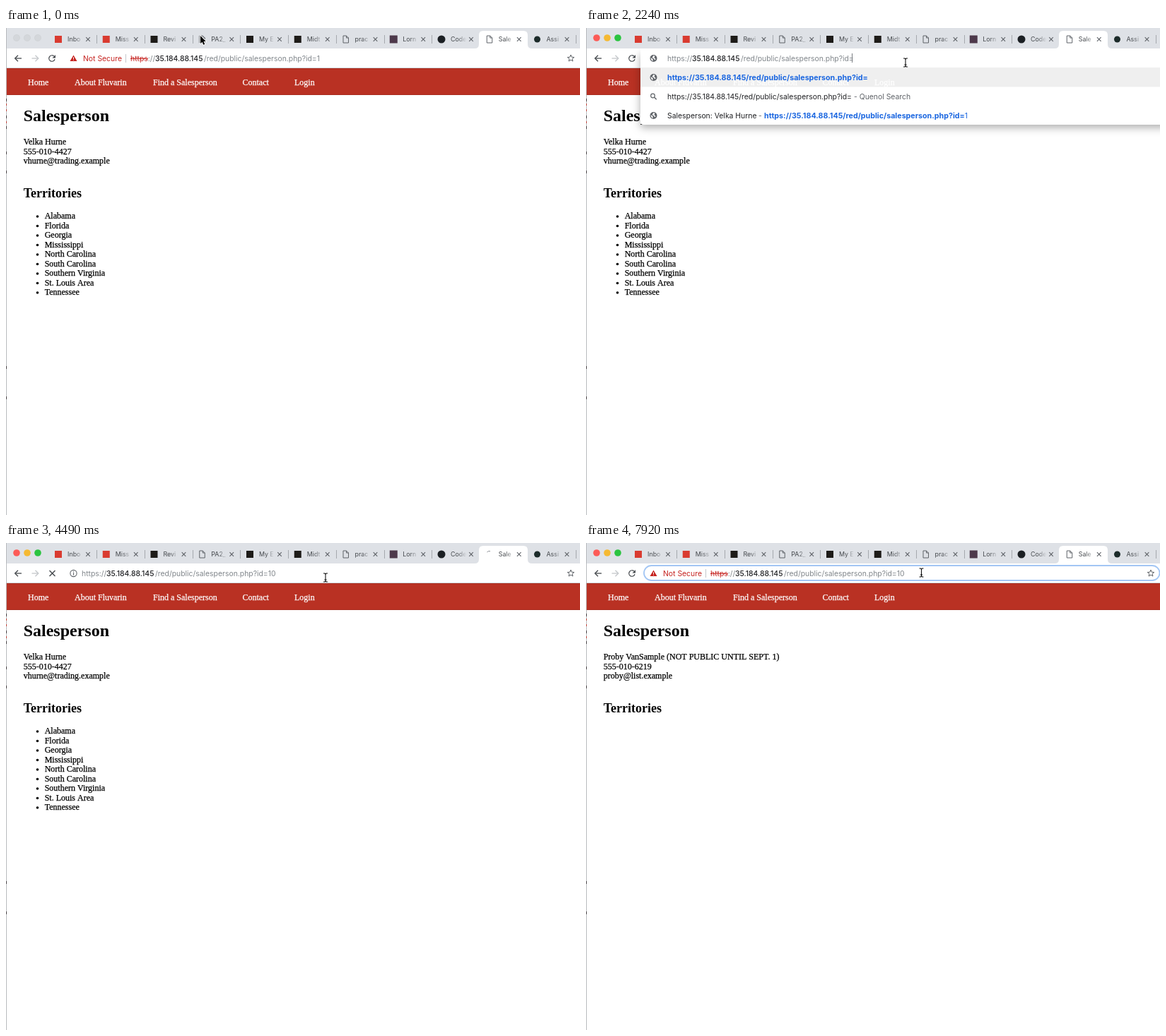
Recreate the animation shown at these times as an HTML page with a canvas. Size 812 by 690 pixels, loop 8 s.

```html
<!DOCTYPE html>
<html lang="en">
<head>
<meta charset="utf-8">
<title>Salesperson</title>
<style>
  html, body { margin: 0; width: 100%; height: 100%; overflow: hidden; background: #fff; }
  canvas { display: block; }
</style>
</head>
<body>
<canvas id="stage" width="812" height="690"></canvas>
<script>
const ctx = document.getElementById('stage').getContext('2d');
const LOOP = 8000;
const SANS = 'Inter, Roboto, "Liberation Sans", sans-serif';
const SERIF = '"Liberation Serif", "Times New Roman", serif';
const UI = `10.4px ${SANS}`;
const UI_HOST = `500 10.4px ${SANS}`;
const UI_BOLD = `700 10.7px ${SANS}`;
const BODY = `12px ${SERIF}`;
const INK = '#202124', GRAY = '#5f6368', SOFT = '#80868b', RED = '#c5221f', BLUE = '#1a66e0';

const TABS = [
  ['Inbo', 'square', '#d93b30', 10], ['Miss', 'square', '#d93b30', 10],
  ['Revi', 'square', '#1d1b18', 10], ['PA2_', 'page'],
  ['My E', 'square', '#1d1b18', 10], ['Midt', 'square', '#1d1b18', 10],
  ['prac', 'page'], ['Lorn', 'square', '#4d394b', 11],
  ['Code', 'circle', '#1b1f23', 11], ['Sale', 'page'],
  ['Assi', 'circle', '#1c2b2a', 9]
];
const ACTIVE = 9;
const NAV = [['Home', 31], ['About Fluvarin', 97], ['Find a Salesperson', 208], ['Contact', 334.5], ['Login', 408]];
const STATES = ['Alabama', 'Florida', 'Georgia', 'Mississippi', 'North Carolina',
  'South Carolina', 'Southern Virginia', 'St. Louis Area', 'Tennessee'];
const FIRST = ['Velka Hurne', '555-010-4427', 'vhurne@trading.example'];
const SECOND = ['Proby VanSample (NOT PUBLIC UNTIL SEPT. 1)', '555-010-6219', 'proby@list.example'];

// Pointer: start time, x, y, text cursor?
const POINTER = [
  [0, 275, 11, 0], [150, 302, 15, 0], [300, 350, 25, 0], [450, 400, 36, 0],
  [600, 430, 43, 1], [750, 440, 46, 1], [900, 442, 47, 1],
  [1350, 445, 48, 1], [1500, 449, 49, 1], [1640, 452, 49, 1],
  [4040, 451, 47, 0], [4490, 452, 49, 1],
  [5540, 455, 47, 1], [5690, 462, 44, 1], [5840, 470, 42.5, 1], [5990, 481, 41, 1],
  [6290, 478, 42, 1], [6440, 474.5, 42, 1]
];
const CARET = [[900, 1350], [1940, 2690], [3290, 4490], [7470, 7920]];
const within = (t, a, b) => t >= a && t < b;

function text(s, x, y, font, color) {
  ctx.font = font;
  ctx.fillStyle = color;
  ctx.fillText(s, x, y);
}

// Page text with the slightly heavier look of smoothed type.
function inkText(s, x, y, font, color) {
  text(s, x, y, font, color);
  ctx.strokeStyle = color;
  ctx.lineWidth = 0.25;
  ctx.strokeText(s, x, y);
}

function measure(s, font) {
  ctx.font = font;
  return ctx.measureText(s).width;
}

function box(x, y, w, h, color) {
  ctx.fillStyle = color;
  ctx.fillRect(x, y, w, h);
}

function disc(x, y, r, color) {
  ctx.fillStyle = color;
  ctx.beginPath();
  ctx.arc(x, y, r, 0, 7);
  ctx.fill();
}

function ring(x, y, r, color, width, from = 0, to = Math.PI * 2) {
  ctx.strokeStyle = color;
  ctx.lineWidth = width;
  ctx.beginPath();
  ctx.arc(x, y, r, from, to);
  ctx.stroke();
}

function path(points, closed) {
  ctx.beginPath();
  points.forEach(([x, y]) => ctx.lineTo(x, y));
  if (closed) ctx.closePath();
}

function line(color, width, ...points) {
  path(points);
  ctx.strokeStyle = color;
  ctx.lineWidth = width;
  ctx.stroke();
}

function cross(x, y, r, color, width) {
  line(color, width, [x - r, y - r], [x + r, y + r]);
  line(color, width, [x - r, y + r], [x + r, y - r]);
}

function pageIcon(x, y) {
  line(GRAY, 1, [x + 1, y - 5], [x - 3.5, y - 5], [x - 3.5, y + 5], [x + 4, y + 5],
    [x + 4, y - 2], [x + 1, y - 5], [x + 1, y - 2], [x + 4, y - 2]);
}

function globe(x, y) {
  disc(x, y, 5, GRAY);
  ctx.fillStyle = '#fff';
  path([[x - 4, y - 1], [x - 1, y + 1], [x - 1, y + 4], [x - 3, y + 2.5]], true);
  ctx.fill();
  path([[x, y - 4], [x + 2, y - 3.3], [x + 1, y - 1], [x + 3, y + 1], [x + 2, y + 2.5], [x, y], [x - 2, y - 1]], true);
  ctx.fill();
}

function magnifier(x, y) {
  ring(x - 1, y - 1, 2.8, GRAY, 1.2);
  line(GRAY, 1.4, [x + 1.2, y + 1.2], [x + 4.2, y + 4.2]);
}

function star(x, y) {
  const pts = Array.from({ length: 11 }, (_, i) => {
    const a = i * Math.PI / 5 - Math.PI / 2, r = i % 2 ? 2.2 : 5;
    return [x + r * Math.cos(a), y + r * Math.sin(a)];
  });
  line(GRAY, 1, ...pts);
}

function drawTab([title, kind, color, size], i, loading) {
  const x = 74 + i * 67.75, y = 16;
  if (i === ACTIVE && loading) {
    ring(x, y, 4.5, '#8a8f94', 1, loading, loading + 1.1);
  } else if (kind === 'page') {
    pageIcon(x, y);
  } else if (kind === 'square') {
    box(x - size / 2, y - size / 2, size, size, color);
  } else {
    disc(x, y, size / 2, color);
  }
  const fade = ctx.createLinearGradient(x + 23, 0, x + 34, 0);
  fade.addColorStop(0, '#45494d');
  fade.addColorStop(1, 'rgba(69,73,77,0.1)');
  text(title, x + 13, 19.4, `8.9px ${SANS}`, fade);
  cross(x + 42, y, 2.8, GRAY, 1.1);
  if (i !== ACTIVE && i !== ACTIVE - 1) box(Math.round(x + 54), 10, 1, 12, '#a5a9ae');
}

function drawTabs(t) {
  box(0, 0, 812, 29, '#dee1e6');
  const lit = t >= 600;
  ['#fc5b57', '#f5b932', '#2bc440'].forEach((c, i) => {
    disc(15 + i * 15, 14, 4.8, lit ? c : '#d4d7db');
    if (!lit) ring(15 + i * 15, 14, 4.5, '#cdd0d4', 0.6);
  });
  ctx.fillStyle = '#fff';
  ctx.beginPath();
  ctx.moveTo(663, 29);
  ctx.quadraticCurveTo(669, 29, 669, 23);
  ctx.lineTo(669, 10);
  ctx.quadraticCurveTo(669, 4, 675, 4);
  ctx.lineTo(732, 4);
  ctx.quadraticCurveTo(738, 4, 738, 10);
  ctx.lineTo(738, 23);
  ctx.quadraticCurveTo(738, 29, 744, 29);
  ctx.fill();
  const spin = within(t, 4490, 4640) ? 3.9 : within(t, 4640, 4790) ? 5.4 : 0;
  TABS.forEach((tab, i) => drawTab(tab, i, spin));
}

function drawButtons(loading) {
  line('#45494d', 1.3, [22, 43], [13, 43]);
  line('#45494d', 1.3, [17, 38.7], [12.7, 43], [17, 47.3]);
  line('#c3c6ca', 1.3, [36.5, 43], [45.5, 43]);
  line('#c3c6ca', 1.3, [41.5, 38.7], [45.8, 43], [41.5, 47.3]);
  if (loading) {
    cross(65.5, 43, 4, '#45494d', 1.4);
  } else {
    ring(65, 43, 4.2, '#45494d', 1.3, 0.3, 5.4);
    ctx.fillStyle = '#45494d';
    path([[70, 38], [70, 42.5], [65.5, 42.5]], true);
    ctx.fill();
  }
}

function drawUrl(x, id, insecure) {
  const y = 46.6;
  if (insecure) {
    text('https', x, y, UI, RED);
    const w = ctx.measureText('https').width;
    box(x, 43, w, 1, RED);
    text('://', x + w, y, UI, SOFT);
  } else {
    text('https://', x, y, UI, SOFT);
  }
  text('35.184.88.145', x + 35, y, UI_HOST, INK);
  text('/red/public/salesperson.php?id=' + id, x + 104, y, UI, SOFT);
}

function drawCaret(t, x) {
  if (CARET.some(([a, b]) => within(t, a, b))) box(x, 36, 1, 13, '#777b80');
}

function drawAddress(t, id, loading) {
  const end = id === '10' ? 448 : 442;
  const focus = within(t, 750, 2240) || t >= 6730 ? 1 : within(t, 6580, 6730) ? 0.5 : 0;
  if (focus) {
    ctx.globalAlpha = focus;
    ctx.strokeStyle = '#a3c6f4';
    ctx.lineWidth = 1.8;
    ctx.beginPath();
    ctx.roundRect(82, 32, 729.5, 21, 10.5);
    ctx.stroke();
    ctx.globalAlpha = 1;
  }
  star(799, 43);
  if (loading) {
    ring(95.5, 43, 4.6, GRAY, 1.1);
    box(95, 42.2, 1.1, 3.4, GRAY);
    box(95, 40.2, 1.1, 1.2, GRAY);
    drawUrl(107, id, false);
    return;
  }
  ctx.fillStyle = RED;
  path([[95.5, 38.5], [100.5, 47], [90.5, 47]], true);
  ctx.fill();
  box(95, 41.3, 1, 2.7, '#fff');
  box(95, 44.8, 1, 1, '#fff');
  text('Not Secure', 109, 46.6, UI, RED);
  box(169, 37, 1, 12, '#c4c7cb');
  if (within(t, 750, 900) || within(t, 6580, 7470)) box(176, 36, end - 176, 14, '#b4d5fe');
  drawUrl(176, id, true);
  drawCaret(t, end);
}

function drawNav(color) {
  NAV.forEach(([label, x]) => inkText(label, x, 80.5, BODY, color));
}

function drawPage(second) {
  box(0, 57, 812, 38, '#a92d20');
  box(1, 58, 811, 36, '#b93123');
  drawNav('#fff');
  text('Salesperson', 24.7, 132.3, `bold 24px ${SERIF}`, '#000');
  (second ? SECOND : FIRST).forEach((s, i) => inkText(s, 24.7, 165 + i * 13.5, BODY, '#000'));
  text('Territories', 24.7, 240.3, `bold 18px ${SERIF}`, '#000');
  if (second) return;
  STATES.forEach((s, i) => {
    const y = 270.3 + i * 13.5;
    disc(44.5, y - 3.3, 1.8, '#000');
    inkText(s, 54.7, y, BODY, '#000');
  });
}

function drawPopup(t, id) {
  const rows = id ? 2 : 3;
  const url = 'https://35.184.88.145/red/public/salesperson.php?id=';
  ctx.save();
  ctx.beginPath();
  ctx.rect(0, 29, 812, 661);
  ctx.clip();
  ctx.shadowColor = 'rgba(0,0,0,0.32)';
  ctx.shadowBlur = 12;
  ctx.shadowOffsetY = 4;
  ctx.fillStyle = '#fff';
  ctx.beginPath();
  ctx.roundRect(77, 33, 760, 23 + rows * 27, 4);
  ctx.fill();
  ctx.restore();
  box(77, 29, 735, 27, '#fff');
  box(77, 56, id === '10' ? 464 : 735, 27.5, '#efefef');
  if (t < 2390) {
    ctx.save();
    ctx.beginPath();
    ctx.rect(77, 57, 735, 27);
    ctx.clip();
    drawNav('#fff');
    ctx.restore();
  }
  globe(95.5, 43);
  drawUrl(115, id, false);
  drawCaret(t, Math.floor(376 + id.length * 5.5));

  globe(95.5, 70);
  text(url + id, 115, 73.6, UI_BOLD, BLUE);
  magnifier(95.5, 97);
  text(url + id, 115, 100.6, UI, INK);
  text('- Quenol Search', 118 + measure(url + id, UI), 100.6, UI, GRAY);
  if (rows === 3) {
    globe(95.5, 124);
    text('Salesperson: Velka Hurne', 115, 127.6, UI, INK);
    text('-', 244, 127.6, UI, GRAY);
    text(url, 252, 127.6, UI_BOLD, BLUE);
    text('1', 252 + measure(url, UI_BOLD), 127.6, UI, BLUE);
  }
}

function drawPointer(t) {
  const [, x, y, beam] = POINTER.filter(p => p[0] <= t).pop();
  if (beam) {
    const shape = [[-3, -6], [-1, -6], [0, -5], [0, 5], [-1, 6], [-3, 6]];
    for (const [color, width] of [['rgba(255,255,255,0.8)', 2.6], ['#111', 1.1]]) {
      line(color, width, ...shape.map(([a, b]) => [x + a, y + b]));
      line(color, width, [x + 3, y - 6], [x + 1, y - 6], [x, y - 5]);
      line(color, width, [x + 3, y + 6], [x + 1, y + 6], [x, y + 5]);
      line(color, width, [x - 1.5, y + 3], [x + 1.5, y + 3]);
    }
    return;
  }
  const arrow = [[0, 0], [0, 11], [2.5, 8.7], [4.3, 12.8], [6.2, 12], [4.5, 8], [7.8, 8]];
  path(arrow.map(([a, b]) => [x + a, y + b]), true);
  ctx.lineJoin = 'round';
  ctx.strokeStyle = '#fff';
  ctx.lineWidth = 1.8;
  ctx.stroke();
  ctx.fillStyle = '#000';
  ctx.fill();
  ctx.lineJoin = 'miter';
}

function drawEdge() {
  box(0, 0, 1, 690, '#b9bbbe');
  [100, 124, 139, 175, 202, 479, 522].forEach(y => box(0, y, 1, 4, '#4a4448'));
  [107, 115, 132].forEach(y => box(0, y, 1, 3, '#c0453c'));
}

function draw(t) {
  box(0, 0, 812, 690, '#fff');
  const loading = within(t, 4490, 4790);
  const popup = within(t, 2240, 4490);
  const id = t < 2240 ? '1' : t < 3740 ? '' : t < 3890 ? '1' : '10';
  drawTabs(t);
  box(0, 56, 812, 1, '#d5d7da');
  drawButtons(loading);
  drawPage(t >= 4790);
  if (popup) drawPopup(t, id);
  else drawAddress(t, id, loading);
  drawEdge();
  drawPointer(t);
}

const start = performance.now();
function tick() {
  draw((performance.now() - start) % LOOP);
  requestAnimationFrame(tick);
}
tick();
</script>
</body>
</html>
```
